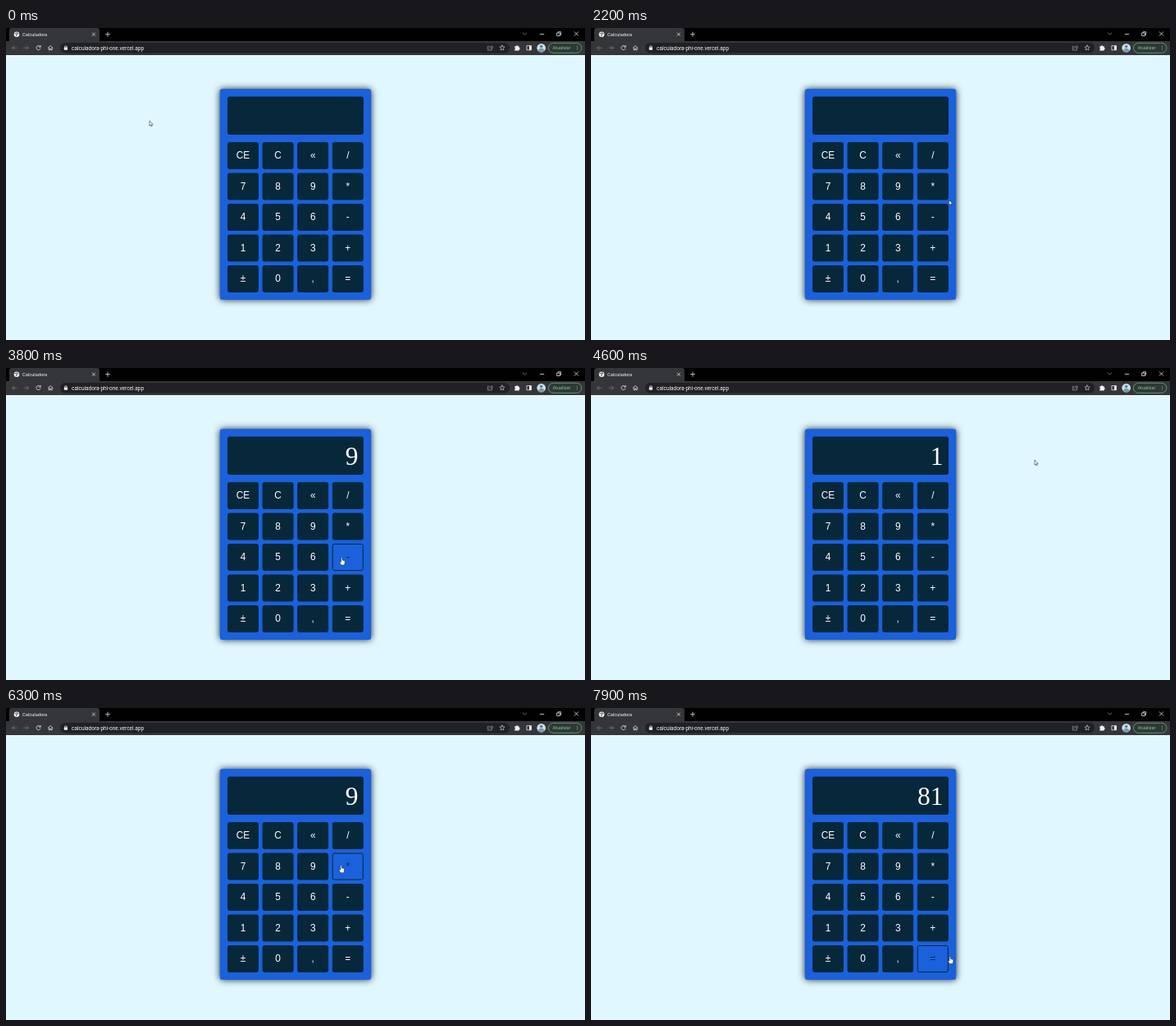
Recreate the animation shown at these times as an HTML page. Size 706 by 380 pixels, loop 8 s.

```html
<!DOCTYPE html>
<html lang="pt">
<head>
<meta charset="utf-8">
<title>Calculadora</title>
<style>
  html, body { margin: 0; width: 100%; height: 100%; overflow: hidden; background: #e1f7ff; }
  svg { display: block; width: 706px; height: 380px; }
  .ui { font-family: Roboto, "Open Sans", sans-serif; fill: #f4f5f6; }
  .icon { fill: none; stroke: #dfe1e5; stroke-width: .8; stroke-linecap: round; stroke-linejoin: round; }
  .dim { stroke: #77797d; }
  .thin { stroke: #b4b6ba; stroke-width: .6; }
  .panel { fill: #1a61db; filter: drop-shadow(0 0 4.4px rgba(0, 15, 30, .9)); }
  .dark { fill: #07283a; }
  .key rect { fill: #07283a; stroke: #07283a; }
  .key text { font: 11.9px "Liberation Sans", Arial, sans-serif; fill: #fff; text-anchor: middle; }
  .key.on rect { fill: #1a61db; }
  .key.on text { fill: #07283a; }
  #out { font: 31.5px "Liberation Serif", "Times New Roman", serif; fill: #fff; text-anchor: end; }
  #arrow, #hand { fill: #fff; stroke: #222; stroke-width: .55; stroke-linejoin: round; }
</style>
</head>
<body>
<svg viewBox="0 0 706 380">
  <rect width="706" height="17" fill="#010101"/>
  <path d="M2 16.5q2 0 2-2V3q0-3 3-3h104q3 0 3 3v11.5q0 2 2 2z" fill="#35363a"/>
  <rect y="16" width="706" height="17" fill="#35363a"/>
  <rect x="66" y="18" width="548" height="12.6" rx="6.3" fill="#202124"/>

  <circle cx="13" cy="7.7" r="3.3" fill="#f1f3f4"/>
  <path d="M10.7 6.4l2 .5.6 1.3-1 1.8M13.4 5.2l.4 1.4 1.6.3" fill="none" stroke="#35363a" stroke-width=".9"/>
  <text class="ui" x="20" y="9.8" font-size="5.7">Calculadora</text>
  <text class="ui" x="80" y="26.6" font-size="6.5">calculadora-phi-one.vercel.app</text>

  <g class="icon">
    <path d="M105.2 6l3.4 3.4m0-3.4l-3.4 3.4M121.4 7.7h5.2M124 5.1v5.2"/>
    <path d="M651.2 7.5h4.6M693.2 4.7l4.6 4.6m0-4.6l-4.6 4.6"/>
    <path d="M672 6h3.5v3.5H672zM673.2 5.8V4.7h3.5v3.5h-1"/>
    <path class="dim" d="M13 24.2H7.6m2.4-2.4l-2.4 2.4 2.4 2.4M22 24.2h5.4m-2.4-2.4l2.4 2.4-2.4 2.4"/>
    <path d="M41.9 22.9a2.6 2.6 0 1 0 .1 2.2M42.2 21.3v1.8h-1.8"/>
    <path d="M51.4 24.2l2.8-2.6 2.8 2.6M52.2 24v2.8h1.4v-1.6h1.2v1.6h1.4V24"/>
    <path d="M71.6 23.7v-.7a1.3 1.3 0 0 1 2.6 0v.7"/>
    <path class="thin" d="M630.3 6l2.2 2 2.2-2M589 22.4h-1.7v4.6h5v-1.4M589 25.2c.2-1.7 1.3-2.3 3-2.3v-1.2l1.9 1.8-1.9 1.8v-1.2"/>
    <path stroke-width=".6" d="M605 21l.9 2 2.2.2-1.7 1.5.5 2.2-1.9-1.1-1.9 1.1.5-2.2-1.7-1.5 2.2-.2z"/>
    <rect x="635.3" y="21.6" width="5.2" height="5.2"/>
  </g>
  <g fill="#f1f3f4">
    <rect x="70.8" y="23.6" width="4.2" height="3.2" rx=".5"/>
    <path d="M620.3 22.3h1.7a1 1 0 0 1 2 0h1.7v1.6a1 1 0 0 1 0 2v1.6h-5.4v-1.7a1 1 0 0 0 0-1.9z"/>
    <rect x="638" y="21.6" width="2.6" height="5.2"/>
  </g>
  <circle cx="652.7" cy="24.2" r="5.3" fill="#c9e3ee"/>
  <path d="M649 28q.4-3.2 3.7-3.2t3.7 3.2a5.3 5.3 0 0 1-7.4 0z" fill="#7d98a6"/>
  <circle cx="652.7" cy="22.6" r="1.8" fill="#67808e"/>
  <rect x="661.4" y="18.3" width="40.4" height="12" rx="6" fill="#2e3935" stroke="#6fa883" stroke-width=".8"/>
  <text class="ui" x="666.5" y="26.3" font-size="5.6" style="fill:#81c995">Atualizar</text>
  <path d="M696.5 22.2v4.1" stroke="#81c995" stroke-linecap="round" stroke-dasharray="0 2"/>

  <rect class="panel" x="260.8" y="74.3" width="184.4" height="256.8" rx="3"/>
  <rect class="dark" x="270" y="83.6" width="166" height="46.4" rx="3"/>
  <text id="out" x="429.5" y="118"></text>
  <g id="keys"></g>

  <path id="arrow" d="M0 0V6.1L1.4 4.9 2.3 7 3.2 6.6 2.3 4.6H4.2Z"/>
  <path id="hand" d="M-.8 5.6V.7Q0-.5.8.7V3.3L3.3 3.9Q4.1 4.2 4 5.1L3.4 9.3H-.6L-2.5 6.2Q-2.4 5.1-1.4 5.6Z"/>
</svg>
<script>
  const $ = id => document.getElementById(id);
  const LOOP = 8000, STEP = 100;
  const W = 38, H = 33, GAP = 4.6;

  const keys = [...'EC«/789*456-123+±0,='].map((c, i) => ({
    label: c === 'E' ? 'CE' : c,
    x: 270 + i % 4 * (W + GAP),
    y: 139 + (i >> 2) * (H + GAP - .1)
  }));
  $('keys').innerHTML = keys.map(({ label, x, y }) =>
    `<g class="key"><rect x="${x + .5}" y="${y + .5}" width="${W - 1}" height="${H - 1}" rx="2"/>` +
    `<text x="${x + W / 2}" y="${y + 20.4}">${label}</text></g>`).join('');
  const nodes = [...$('keys').children];

  const at = (time, x, y) => ({ time, x, y, leave: time });
  // rests on a key and clicks it when leaving
  const press = (time, label, leave) => {
    const { x, y } = keys.find(k => k.label === label);
    return { time, label, leave, x: x + W / 2 - 1.5, y: y + H / 2 - 1.5 };
  };

  const stops = [
    at(0, 175, 113), at(200, 106, 160), at(400, 205, 260), at(600, 369, 110),
    at(800, 107, 50), at(900, 107, 50), at(1400, 440, 50), at(1600, 700, 130), at(1800, 686, 262),
    at(2200, 436.6, 209.5), press(2400, '9', 2600), press(3100, '/', 3200), press(3400, '9', 3600),
    at(4000, 446, 270), press(4200, '=', 4400), at(4600, 541, 112), at(4800, 576, 66),
    press(5100, 'C', 5300), at(5600, 367, 184.5), press(5800, '9', 6000), press(6400, '*', 6500),
    at(6900, 499, 195), at(7000, 513, 194), press(7300, '9', 7400), press(7700, '=', 7800),
    at(7900, 437.8, 302.3)
  ];

  function pointer(t) {
    const i = stops.findLastIndex(s => s.time <= t);
    const a = stops[i], b = stops[i + 1];
    if (!b || t <= a.leave) return a;
    const u = (t - a.leave) / (b.time - a.leave), e = u * u * (3 - 2 * u);
    return { x: a.x + (b.x - a.x) * e, y: a.y + (b.y - a.y) * e };
  }

  function result(t) {
    let shown = '', held, op;
    for (const { label, leave } of stops) {
      if (!label || leave > t) continue;
      if (label === 'C') shown = '';
      else if (label === '=') shown = op === '/' ? held / shown : held * shown;
      else if (label === '/' || label === '*') [held, op] = [shown, label];
      else shown = label;
    }
    return shown;
  }

  function draw(t) {
    const { x, y } = pointer(t);
    const hit = keys.findIndex(k => x >= k.x && x <= k.x + W + 2 && y >= k.y && y <= k.y + H - .3);
    nodes.forEach((n, i) => n.classList.toggle('on', i === hit));
    $('out').textContent = result(t);
    for (const id of ['arrow', 'hand']) {
      $(id).setAttribute('transform', `translate(${x} ${y})`);
      $(id).style.display = (id === 'hand') === (hit >= 0) ? '' : 'none';
    }
  }

  const start = performance.now();
  function tick() {
    const t = (performance.now() - start) % LOOP;
    draw(Math.floor(t / STEP) * STEP);
    requestAnimationFrame(tick);
  }
  tick();
</script>
</body>
</html>
```
